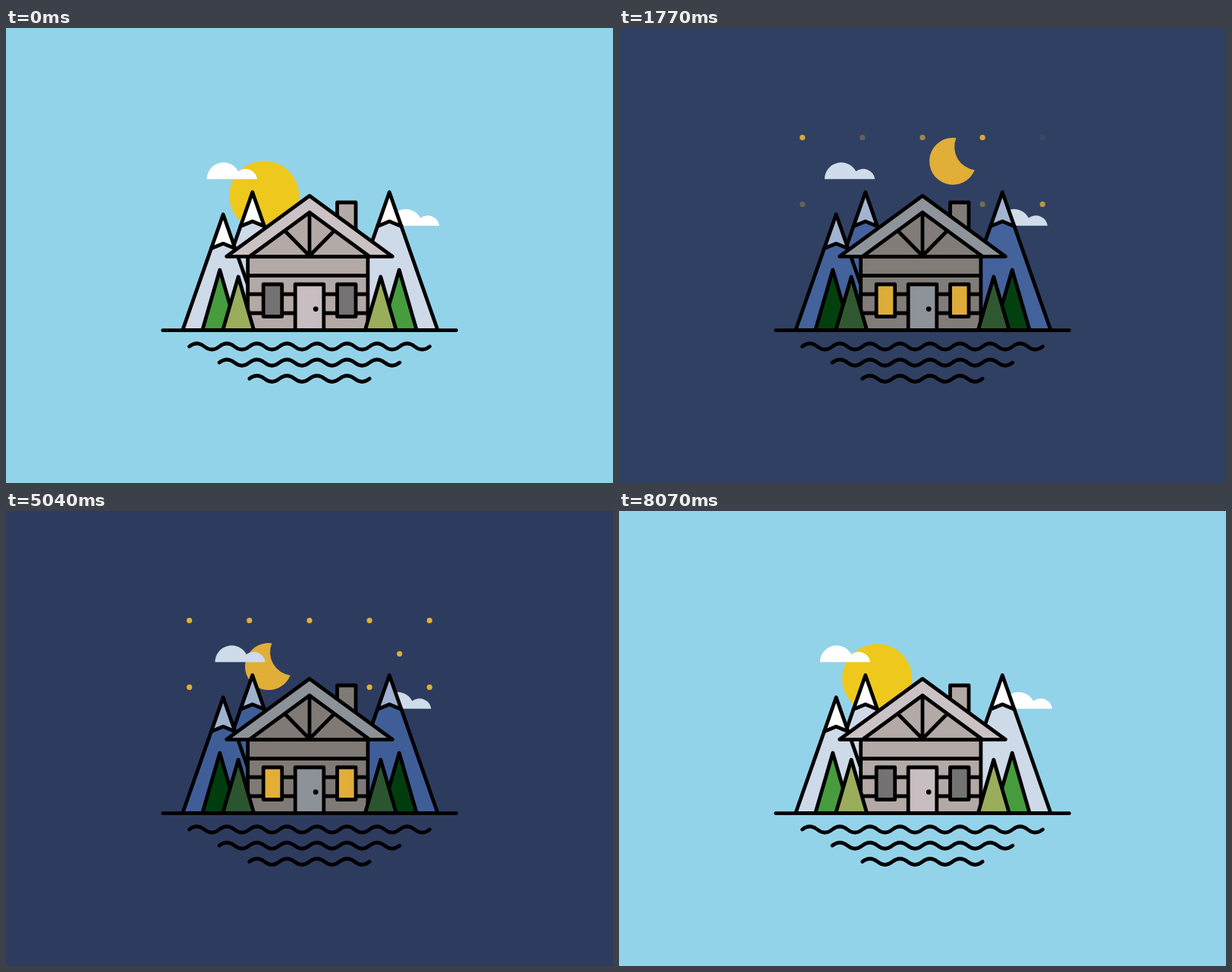
Write an HTML page that moves like this. It is 800 px wide and 600 px high and loops after 8.1 s.

```html
<!DOCTYPE html>
<html lang="en">
<head>
<meta charset="utf-8">
<title>Cabin, day and night</title>
<style>
  html, body { margin: 0; width: 100%; height: 100%; overflow: hidden; }
  svg { display: block; width: 100vw; height: 100vh; background: var(--sky); }
  .line { fill: none; stroke: #000; stroke-width: 4.8; stroke-linecap: round; stroke-linejoin: round; }
  .sun { fill: #eec81c; }
  .gold { fill: #e1ae38; }
  .cloud { fill: var(--cloud); }
  .rock { fill: var(--rock); }
  .snow { fill: var(--snow); }
  .wall { fill: var(--wall); }
  .roof { fill: var(--roof); }
  .door { fill: var(--door); }
  .pane { fill: var(--pane); }
  .pine { fill: var(--pine); }
  .leaf { fill: var(--leaf); }
  .smoke { fill: none; stroke: var(--cloud); stroke-width: 4.2; stroke-linecap: round; }
</style>
</head>
<body>
<svg id="stage" viewBox="0 0 800 600">
  <defs>
    <clipPath id="air"><rect width="800" height="398"/></clipPath>
    <path id="puff" d="M264.8 199.3a21.9 21.9 0 0 1 41.3 -10.2a15.6 15.6 0 0 1 25 10.2z"/>
  </defs>
  <g id="stars" class="gold"></g>
  <g clip-path="url(#air)">
    <circle id="sun" class="sun" r="46"/>
    <path id="moon" class="gold" d="M4.3 -30.7A31 31 0 1 0 28.7 11.7A31 31 0 0 1 4.3 -30.7z"/>
  </g>
  <use id="cloudL" class="cloud" href="#puff"/>
  <use id="cloudR" class="cloud" href="#puff"/>
  <path id="smokeL" class="smoke" d="M443 218.5q-5 -6.5 0 -13t0 -13t0 -13"/>
  <path id="smokeR" class="smoke" d="M454.5 218.5q-5 -6.5 0 -13t0 -13t0 -13t0 -13"/>
  <g id="peaks"></g>
  <g class="line">
    <rect class="wall" x="436.5" y="230" width="24.5" height="50"/>
    <rect class="wall" x="318.7" y="301" width="158.2" height="97.5"/>
    <path d="M318.7 326.5h158.2M318.7 351h158.2M318.7 376h158.2"/>
    <path class="roof" d="M400 221.3L509.3 301.3H290.7z"/>
    <path class="wall" d="M400 243.2L479 301.3H321z"/>
    <path d="M400 243.2V301.3M368 268L400 300.5L432 268"/>
    <rect class="pane" x="339.2" y="338" width="24.5" height="42.5"/>
    <rect class="pane" x="436.5" y="338" width="24.5" height="42.5"/>
    <rect class="door" x="381.2" y="338" width="37.6" height="60.5"/>
  </g>
  <circle cx="408.2" cy="370.6" r="3.4"/>
  <g id="trees"></g>
  <path class="line" d="M206.7 398.7H593.3"/>
  <g id="waves"></g>
</svg>
<script>
const LOOP = 8100, STEP = 30;
const $ = id => document.getElementById(id);
const stage = $('stage');

// [day, night]
const PALETTE = {
  sky: [[147, 211, 234], [45, 59, 95]],
  cloud: [[255, 255, 255], [206, 219, 232]],
  rock: [[206, 218, 232], [63, 94, 152]],
  snow: [[255, 255, 255], [160, 177, 207]],
  wall: [[179, 169, 167], [128, 122, 119]],
  roof: [[203, 194, 197], [140, 146, 152]],
  door: [[200, 190, 193], [140, 146, 152]],
  pane: [[116, 114, 115], [226, 174, 56]],
  pine: [[71, 156, 62], [0, 61, 14]],
  leaf: [[154, 173, 91], [43, 85, 47]]
};

// x, y, delay in steps
const STARS = [
  [241.7, 144.4, 0], [320.8, 144.4, 9.5], [400, 144.4, 4.5], [479.1, 144.4, 0],
  [558.2, 144.4, 13], [518.7, 188.3, 15], [241.7, 232.4, 9.5], [479.1, 232.4, 8],
  [558.2, 232.4, 2]
];

function add(parent, tag, attrs) {
  const el = document.createElementNS('http://www.w3.org/2000/svg', tag);
  for (const k in attrs) el.setAttribute(k, attrs[k]);
  return parent.appendChild(el);
}

function triangle(parent, kind, x, y, half) {
  add(parent, 'path', { class: 'line ' + kind, d: `M${x} ${y}L${x + half} 398.5H${x - half}z` });
}

function peak(x, y) {
  const slope = 0.35, drop = 45, w = slope * drop;
  const edge = `M${x - w} ${y + drop}L${x} ${y + drop - 6.5}L${x + w} ${y + drop}`;
  const half = slope * (398.5 - y);
  add($('peaks'), 'path', { class: 'rock', d: `M${x} ${y}L${x + half} 398.5H${x - half}z` });
  add($('peaks'), 'path', { class: 'snow', d: `${edge}L${x} ${y}z` });
  add($('peaks'), 'path', { class: 'line', d: edge });
  triangle($('peaks'), '', x, y, half);
}

peak(324.8, 216.5);
peak(286.2, 245.8);
peak(505.3, 216.5);

for (const side of [-1, 1]) {
  triangle($('trees'), 'pine', 400 + side * 118.2, 319, 23);
  triangle($('trees'), 'leaf', 400 + side * 93.8, 328, 20.5);
}

[[8, 420], [6, 441.2], [4, 462.4]].forEach(([periods, y]) => {
  const half = 19.8;
  add($('waves'), 'path', {
    class: 'line',
    d: `M${400 - periods * half} ${y}q${half / 2} -8 ${half} 0` + `t${half} 0`.repeat(periods * 2 - 1)
  });
});

const stars = STARS.map(([cx, cy]) => add($('stars'), 'circle', { cx, cy, r: 3.6 }));
const smokes = [
  { el: $('smokeL'), head: [80, 112], tail: [92, 126] },
  { el: $('smokeR'), head: [90, 130.5], tail: [99, 142] }
].map(s => ({ ...s, len: s.el.getTotalLength() }));

const ramp = (f, a, b) => Math.min(1, Math.max(0, (f - a) / (b - a)));
const smooth = u => u * u * (3 - 2 * u);
const turn = (f, start) => 180 * smooth(ramp(f, start, start + 48.3));

function move(el, x, y) {
  el.setAttribute('transform', `translate(${x.toFixed(3)} ${y.toFixed(3)})`);
}

function orbit(el, cx, cy, r, deg) {
  const a = deg * Math.PI / 180;
  move(el, cx + r * Math.cos(a), cy + r * Math.sin(a));
}

function draw(ms) {
  const f = ms / STEP;

  const night = ramp(f, 30, 60) - ramp(f, 180, 210);
  for (const name in PALETTE) {
    const [day, dark] = PALETTE[name];
    const rgb = day.map((c, i) => Math.round(c + (dark[i] - c) * night));
    stage.style.setProperty('--' + name, `rgb(${rgb})`);
  }

  // both turn counter-clockwise; each waits behind the cabin on the far side
  const spin = turn(f, 30) + turn(f, 180);
  orbit($('sun'), 406.5, 284, 91.3, 223.5 - spin);
  orbit($('moon'), 417, 267, 94.2, 401.1 - spin);

  const drift = 14.2 * (1 - Math.abs(2 * ms / LOOP - 1));
  move($('cloudL'), drift, 0);
  move($('cloudR'), 240 - drift, 61.4);

  stars.forEach((el, i) => {
    const d = STARS[i][2];
    el.setAttribute('opacity', ramp(f, 45 + d, 60 + d) - ramp(f, 179.5 + d, 194.5 + d));
  });

  for (const { el, head, tail, len } of smokes) {
    const a = len * ramp(f, ...tail), b = len * ramp(f, ...head);
    el.style.visibility = b > a ? 'visible' : 'hidden';
    el.setAttribute('stroke-dasharray', `0 ${a} ${b - a} ${len * 2}`);
    // the empty first dash must not leave a round cap at the start
    el.setAttribute('stroke-dasharray', `${b - a} ${len * 2}`);
    el.setAttribute('stroke-dashoffset', -a);
  }
}

const t0 = performance.now();
function tick() {
  draw((performance.now() - t0) % LOOP);
  requestAnimationFrame(tick);
}
tick();
</script>
</body>
</html>
```
